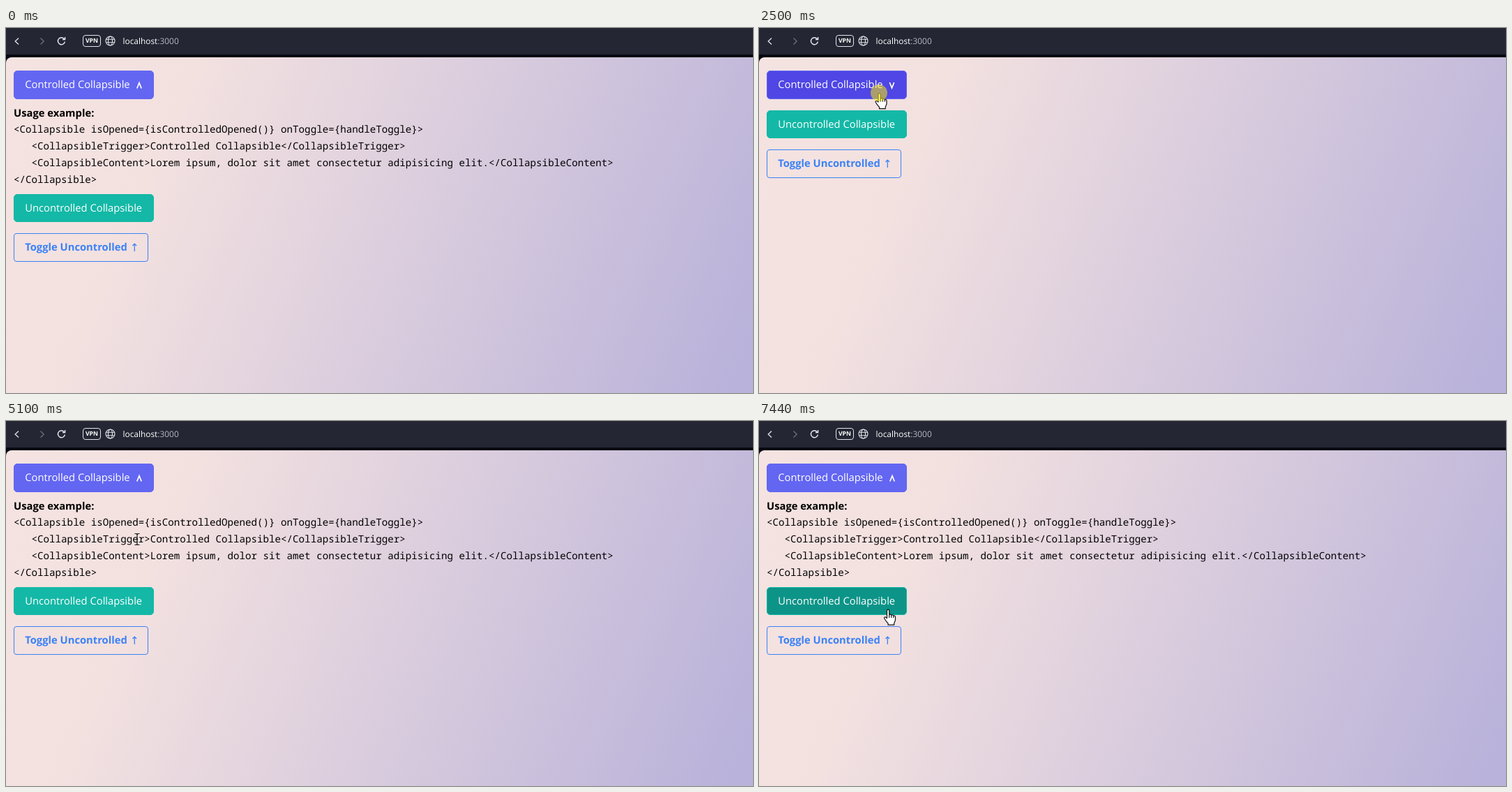
An HTML page that plays this animation: 1071 by 523 pixels, repeating every 8 s.

```html
<!DOCTYPE html>
<html lang="en">
<head>
<meta charset="utf-8">
<title>Collapsible demo</title>
<style>
  html, body { margin: 0; width: 100%; height: 100%; overflow: hidden; background: #05060f; }
  body { position: relative; font: 14.75px/24px "Open Sans", "Noto Sans", sans-serif; color: #000; text-rendering: geometricPrecision; }
  #bar { position: absolute; left: 0; top: 0; width: 100%; height: 38px; background: #242633; }
  #bar svg { position: absolute; left: 0; top: 0; }
  #bar p { position: absolute; margin: 0; left: 167.5px; top: 7px; font-size: 11.9px; color: #b4b7c6; }
  #bar b { font-weight: 400; color: #fff; }
  #vpn { position: absolute; left: 110px; top: 10px; width: 26px; height: 17px; box-sizing: border-box;
    border: 1.4px solid #e4e5ec; border-radius: 4px; color: #fff; text-align: center; font-weight: 700; font-size: 8.6px; line-height: 15px; }
  #page { position: absolute; left: 0; top: 42px; right: 0; bottom: 0; border-radius: 8px 0 0 0; overflow: hidden;
    background: linear-gradient(113deg, #f4e3e1 0%, #f3e1e0 22%, #b9b2da 97%); }
  #list { position: absolute; left: 11px; top: 19px; }
  .btn { position: relative; box-sizing: border-box; width: 200.5px; height: 40.5px; border: 1px solid; border-radius: 5px;
    padding-left: 15.2px; line-height: 38.5px; white-space: nowrap; }
  .btn span { color: #fff; }
  .btn svg { position: absolute; left: -1px; top: -1px; fill: none; }
  #a { border-color: #6366f1; }
  #b { border-color: #14b8a6; }
  #c { width: 193px; border-color: #3b82f6; color: #3b82f6; font-weight: 700; border-radius: 4px; }
  .panel { margin: 8px 0; width: 880px; height: 120px; overflow: hidden; }
  .panel b { display: block; }
  pre { margin: 0; font: 14.208px/24px "Noto Sans Mono", "DejaVu Sans Mono", monospace; }
  #over { position: absolute; left: 0; top: 0; }
</style>
</head>
<body>
<div id="bar">
  <svg width="260" height="38" fill="none" stroke="#e4e5ec" stroke-width="1.3">
    <path d="M18 14.5L13.2 19L18 23.5"/>
    <path d="M49.5 14.5L54.2 19L49.5 23.5" stroke="#6d7080"/>
    <path d="M83.4 15.6A5 5 0 1 0 84.4 19.6M84.6 13V16.6H81" stroke-width="1.5"/>
    <g stroke-width="1.1">
      <circle cx="149.5" cy="18.5" r="6.5"/><ellipse cx="149.5" cy="18.5" rx="3" ry="6.5"/>
      <path d="M143.6 16.3H155.4M143.6 20.7H155.4"/>
    </g>
  </svg>
  <div id="vpn">VPN</div>
  <p><b>localhost</b>:3000</p>
</div>
<div id="page">
  <div id="list">
    <div class="btn" id="a"><span>Controlled Collapsible</span>
      <svg width="200" height="41" stroke="#fff" stroke-width="1.7"><path id="chev"/></svg></div>
    <div class="panel" id="pa"><b>Usage example:</b><pre>&lt;Collapsible isOpened={isControlledOpened()} onToggle={handleToggle}&gt;
   &lt;CollapsibleTrigger&gt;Controlled Collapsible&lt;/CollapsibleTrigger&gt;
   &lt;CollapsibleContent&gt;Lorem ipsum, dolor sit amet consectetur adipisicing elit.&lt;/CollapsibleContent&gt;
&lt;/Collapsible&gt;</pre></div>
    <div class="btn" id="b"><span>Uncontrolled Collapsible</span></div>
    <div class="panel" id="pb"><b>Usage example:</b><pre>&lt;Collapsible&gt;
   &lt;CollapsibleTrigger&gt;Uncontrolled Collapsible&lt;/CollapsibleTrigger&gt;
   &lt;CollapsibleContent&gt;Lorem ipsum, dolor sit amet consectetur adipisicing elit.&lt;/CollapsibleContent&gt;
&lt;/Collapsible&gt;</pre></div>
    <div class="btn" id="c">Toggle Uncontrolled
      <svg width="193" height="41" stroke="#3b82f6" stroke-width="1.3"><path d="M173.3 26V15.2M170.5 18L173.3 15.2L176.1 18"/></svg></div>
  </div>
</div>
<svg id="over" width="1071" height="523">
  <g id="cursor" stroke="#111" stroke-width="1.2" stroke-linejoin="round" fill="#fff">
    <path id="hand" d="M-1 13V2.2a1.6 1.6 0 0 1 3.2 0V8.5q.3-1 1.6-.9 1.4.1 1.5 1.3.4-.8 1.5-.6 1.4.2 1.5 1.5.6-.6 1.4-.3 1.3.4 1.3 1.7v4.3c0 2-1.8 3.5-1.8 5.2v2h-8.6v-2c-1.4-2-4.4-5-5.4-7.6-.6-1.6 1.4-2.4 2.3-1.1zM2.2 8.5v4M5.3 9v3.5M8.3 10v2.5"/>
    <path id="beam" fill="none" d="M-3.5 -8H-1L0 -7L1 -8H3.5M0 -7V7M-3.5 8H-1L0 7L1 8H3.5"/>
    <path id="arrow" d="M0 0V16.5L3.9 12.8L6.6 19L9.2 17.9L6.5 11.8H11.7Z"/>
    <circle id="dot" r="12" fill="#fff000" stroke="none"/>
  </g>
</svg>
<script>
const $ = id => document.getElementById(id);
const LOOP = 8000, STEP = 70;

// spans in which the picture moves; it rests in between
const spans = [[510, 1490], [1620, 1970], [2500, 2920], [3450, 3870], [4330, 5870], [6000, 6000], [6350, 6910], [7370, 7440]];

// time, x, y of the pointer tip
const path = [
  [510, 204, 369], [650, 204, 300], [860, 198, 230], [1070, 183, 135], [1280, 172, 95], [1420, 172, 93],
  [4750, 172, 93], [4900, 178, 118], [5100, 188, 169.5],
  [5450, 191, 218], [5870, 184.5, 268.5], [6000, 184.5, 269.5]
];

const togglesA = [[1620, 0], [2500, 1], [3450, 0], [4330, 1]];
const clicks = [...togglesA.map(c => c[0]), 6350, 7370];

const clamp = v => Math.max(0, Math.min(1, v));
const smooth = v => v * v * (3 - 2 * v);

function snap(t) {
  const s = spans.filter(s => s[0] <= t).pop();
  if (!s) return 0;
  return Math.min(s[1], s[0] + Math.floor((t - s[0]) / STEP) * STEP);
}

function pointer(t) {
  const i = path.findIndex(p => p[0] > t);
  if (i < 0) return path[path.length - 1].slice(1);
  const [p, q] = [path[i - 1], path[i]], k = (t - p[0]) / (q[0] - p[0]);
  return [p[1] + (q[1] - p[1]) * k, p[2] + (q[2] - p[2]) * k];
}

const progress = age => smooth(clamp((age - 30) / 300));

function openA(t) {
  const c = togglesA.filter(c => c[0] <= t).pop();
  if (!c) return 1;
  const k = progress(t - c[0]);
  return c[1] ? k : 1 - k;
}

const openB = t => t < 6350 || t >= 7440 ? 0 : progress(t - 6350);

function dotAlpha(t) {
  const c = clicks.filter(c => c <= t).pop();
  if (!c || t >= 7440) return 0;
  return (c < 6000 ? 0.52 : 0.6) * clamp(1 - (t - c) / 350);
}

function render(now) {
  const t = snap(now), a = openA(t), b = openB(t);
  $('pa').style.height = a * 120 + 'px';
  $('pb').style.height = b * 120 + 'px';

  const last = togglesA.filter(c => c[0] < t).pop();
  const up = !last || last[1];
  $('chev').setAttribute('d', up ? 'M176.8 25.5L180 17.6L183.2 25.5' : 'M176.3 17L179.5 24.9L182.7 17');

  const shown = t >= 510;
  const [x, y] = shown ? pointer(t) : [0, 0];
  const topB = 117.5 + a * 120, topC = topB + 56.5 + b * 120;
  const on = (top, w = 200) => shown && x >= 11 && x <= 11 + w && y >= top && y <= top + 40.5;
  const onA = on(61), onB = on(topB);
  $('a').style.background = onA ? '#4f46e5' : '#6366f1';
  $('b').style.background = onB ? '#0d9488' : '#14b8a6';

  const kind = onA || onB || on(topC, 192) ? 'hand' : y >= 110 && y < 110 + a * 120 ? 'beam' : 'arrow';
  for (const id of ['hand', 'beam', 'arrow']) $(id).style.display = id === kind ? '' : 'none';
  $('cursor').style.display = shown ? '' : 'none';
  $('cursor').setAttribute('transform', `translate(${x} ${y})`);
  $('dot').setAttribute('opacity', dotAlpha(t));
}

const start = performance.now();
function tick() {
  render((performance.now() - start) % LOOP);
  requestAnimationFrame(tick);
}
tick();
</script>
</body>
</html>
```
